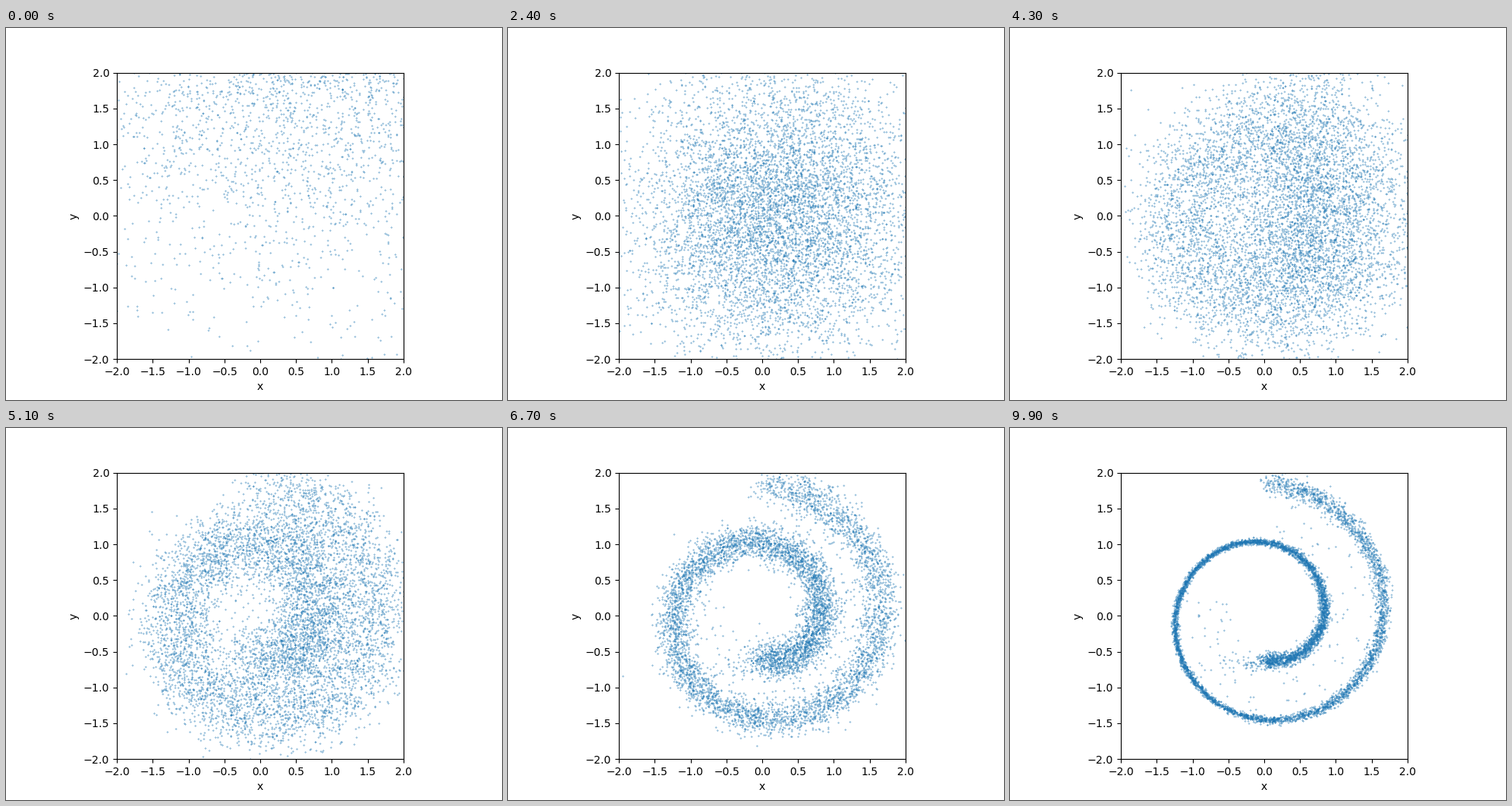
Animation of 640 by 480 pixels, one loop 10 s. Source, as a matplotlib script:

```python
import numpy as np
import matplotlib.pyplot as plt
from matplotlib.animation import FuncAnimation

FRAMES = 100
N = 7000
PI = np.pi
rng = np.random.default_rng(4)


def spiral(t, r):
    return np.column_stack([r * np.cos(t), r * np.sin(t)]) / 7.6


def make_roll():
    """Swiss roll, blurred at both ends, with a few strays between the arms."""
    t = 1.5 * PI * (1 + 2 * rng.random(N))
    width = np.interp(t / PI, [1.5, 2, 2.6, 3.4, 4, 4.5],
                      [0.055, 0.035, 0.014, 0.014, 0.05, 0.075])
    pts = spiral(t, t) + width[:, None] * rng.normal(size=(N, 2))

    strays = 130
    ts = rng.uniform(2.9, 4.53, strays) * PI
    pts[:strays] = spiral(ts, ts - 2 * PI * rng.random(strays))

    tail = 90
    pts[strays:strays + tail] = np.column_stack([
        0.15 - rng.exponential(0.33, tail),
        rng.normal(-0.66, 0.06, tail)])
    return pts


def diffuse(pts):
    """Add noise step by step; played backwards this is the denoising."""
    noise = np.exp(np.interp(np.arange(FRAMES),
                             [0, 24, 35, 51, 67, 83, 99],
                             np.log([0.95, 0.78, 0.6, 0.28, 0.125, 0.06, 0.016])))
    keep = np.sqrt(1 - noise ** 2)
    path = np.empty((FRAMES, N, 2))
    x = keep[-1] * pts + noise[-1] * rng.normal(size=pts.shape)
    path[-1] = x
    for k in range(FRAMES - 2, -1, -1):
        a = keep[k] / keep[k + 1]
        x = a * x + np.sqrt(1 - a * a) * rng.normal(size=x.shape)
        path[k] = x
    return path


path = diffuse(make_roll())

# The cloud starts wide and high, then settles on the centre.
fade = np.exp(-np.arange(FRAMES) / 4)[:, None, None]
path = path * (1 + fade * np.array([0.75, 1.0])) + fade * np.array([0.5, 3.0])

fig, ax = plt.subplots(figsize=(6.4, 4.8), dpi=100)
dots = ax.scatter(path[0, :, 0], path[0, :, 1], s=0.1)
ax.set_aspect("equal")
ax.set_xlim(-2, 2)
ax.set_ylim(-2, 2)
ax.set_xlabel("x")
ax.set_ylabel("y")


def update(k):
    dots.set_offsets(path[k])
    return (dots,)


anim = FuncAnimation(fig, update, frames=FRAMES, interval=100,
                     repeat=True, repeat_delay=0)
plt.show()
```
